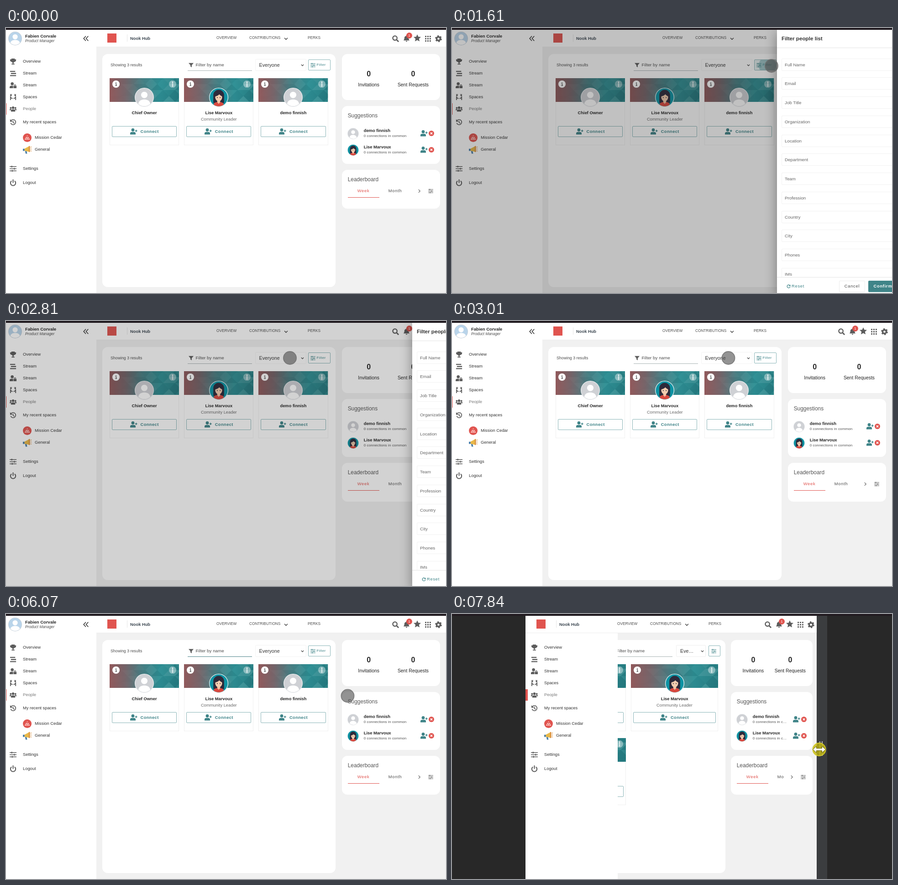
An HTML page for the animation above (8 s loop, 964x581 px).

```html
<!DOCTYPE html>
<html lang="en">
<head>
<meta charset="utf-8">
<title>People directory</title>
<style>
html, body { margin: 0; width: 100%; height: 100%; overflow: hidden; background: #282828; }
#stage { position: relative; width: 964px; height: 581px; overflow: hidden; background: #282828;
  font: 9.33px/20px "Liberation Sans", Arial, sans-serif; color: #4d4d4d; }
#stage div, .i { position: absolute; box-sizing: border-box; }
.t { white-space: nowrap; }
.b { font-weight: bold; color: #262626; }
.cut { overflow: hidden; text-overflow: ellipsis; }
#strip { left: 0; top: 0; width: 964px; height: 4px; background: #211b20; }
#app { top: 0; bottom: 0; overflow: hidden; background: #f1f1f1; }
.body { left: 202px; right: 0; top: 0; bottom: 0; }
.narrow .body { left: 0; }
.menu { left: 0; top: 0; width: 202px; bottom: 0; background: #fff; }
.narrow .menu { clip-path: inset(42px 0 0 0); }
.narrow .user, .narrow .word { display: none; }
.head { left: 0; right: 0; top: 0; height: 42px; background: #fff; border-bottom: 1px solid #ececec; }
.nav { left: calc(50% - 120px); top: 0; width: 228px; height: 42px; font-size: 8.25px; }
.panel { background: #fff; border-radius: 12px; overflow: hidden; }
.main { left: 13px; top: 57px; bottom: 13px; width: calc((100% - 26px) * .69); }
.side { right: 13px; top: 0; bottom: 0; width: calc((100% - 26px) * .291); }
.side .panel { left: 0; right: 0; }
.name { right: 183px; top: 11px; width: 141px; height: 26px; border-bottom: 1px solid #a9b3b5; font-size: 9.8px; }
.name.on { border-bottom: 1.5px solid #4b8288; }
.narrow .name { right: 116px; }
.pick { right: 64px; top: 11px; width: 112px; height: 26px; border: 1px solid #f3f3f3; border-radius: 2px; }
.pick .t { left: 8px; right: 24px; top: 2px; font-size: 10.67px; color: #333; }
.pick.on { right: 65px; width: 110px; background: #a9def1; border: 2px solid #6fa9ba; }
.pick.on .t { left: 6px; top: 1px; color: #51798a; }
.narrow .pick { right: 43px; width: 65px; border-color: #eee; }
.filter { right: 11px; top: 12px; width: 49px; height: 24px; border: 1px solid #8bb5b8; border-radius: 2px; color: #3f8488; overflow: hidden; }
.filter.on { background: radial-gradient(circle at 28px 12px, #9dc3c6 18px, #e3eeee 20px); }
.narrow .filter { width: 26px; }
.cards { left: 16px; right: 16px; top: 53px; display: grid; grid-template-columns: repeat(3, 1fr); gap: 15px 11px; }
.narrow .cards { grid-template-columns: repeat(2, 1fr); }
#stage .card { position: relative; height: 147px; border: 1px solid #f0f0f0; }
.card .mid { left: 0; right: 0; text-align: center; }
.banner { position: absolute; left: -1px; top: -1px; width: calc(100% + 2px); height: 52px; }
.connect { left: 4px; right: 4px; top: 104px; height: 24px; border: 1px solid #8bb5b8; border-radius: 2px;
  display: flex; align-items: center; justify-content: center; gap: 7px; color: #3f8488; font-weight: bold; letter-spacing: .4px; }
.connect .i { position: static; }
#dim { left: 0; top: 4px; width: 964px; bottom: 0; background: #212121; }
#drawer { left: 690px; top: 4px; width: 274px; bottom: 0; background: #fff; box-shadow: 0 8px 24px 2px #0005; overflow: hidden; }
.field { left: 10px; width: 259px; height: 27px; border: 1px solid #f2f2f2; border-radius: 2px; font-size: 9.8px; line-height: 25px; padding-left: 6px; color: #666; }
.btn { top: 550px; height: 25px; line-height: 25px; text-align: center; border-radius: 2px; letter-spacing: .75px; }
#popup { left: 546px; top: 94px; width: 221px; height: 85px; border: 2px solid #989898; border-radius: 8px; font-size: 10.67px;
  box-shadow: 0 12px 40px #0003, 0 2px 12px #0004; }
.open { background: #fff; }
.half { background: #fffb; }
.ghost .t { display: none; }
#handle { top: 4px; bottom: 0; width: 23px; background: #3b3d3f; }
#handle div { top: 275px; width: 2px; height: 32px; background: #b5b5b5; }
#cursor { width: 30px; height: 30px; border-radius: 50%; background: #4b4b4b99; border: 2px solid #73737399; }
#cursor.hit { background: #bdb40fd0; border-color: #d6cd2ce0; }
#cursor svg { display: none; left: -2px; top: -2px; }
#cursor.drag svg { display: block; }
</style>
</head>
<body>
<svg width="0" height="0" style="position:absolute"><defs>
  <linearGradient id="dusk">
    <stop offset="0" stop-color="#91595b"/><stop offset=".22" stop-color="#766469"/>
    <stop offset=".45" stop-color="#4a7d82"/><stop offset=".72" stop-color="#2e8f94"/><stop offset="1" stop-color="#277f84"/>
  </linearGradient>
</defs></svg>
<div id="stage"></div>
<script>
const TEAL = '#3f8488', RED = '#e0544f', GREY = '#5c5c5c';
const line = (d, w = 2) => `<path d="${d}" fill="none" stroke="currentColor" stroke-width="${w}"/>`;
const fill = d => `<path d="${d}"/>`;
const dot = (x, y, r, c = 'currentColor') => `<circle cx="${x}" cy="${y}" r="${r}" fill="${c}"/>`;

// All icons live in a 16 x 16 box.
const icons = {
  trophy: fill('M4 1h8v2h3v2c0 2-2 3.500-4 3.800-.5 1.200-1.500 1.700-2 2V13h2.500v2h-7v-2H7v-2.200c-.5-.3-1.500-.8-2-2C3 8.500 1 7 1 5V3h3z'),
  stream: fill('M1 2h12v2.500H1zM3 7h12v2.500H3zM1 12h14v2.500H1z'),
  lock: dot(6, 4.5, 3.5) + fill('M0 15v-2.500C0 10 2 9 4 9h4v6zM9 9.500h1V8.500a2.500 2.500 0 0 1 5 0v1h1V15H9zm2.500 0h2v-1a1 1 0 0 0-2 0z'),
  spaces: dot(3, 4, 2) + dot(13, 4, 2) + line('M2 15V8l3 3h2M14 15V8l-3 3H9', 2) + line('M5.500 1.500H1M10.500 1.500H15', 1),
  people: dot(8, 5, 3) + dot(2.5, 5.5, 2) + dot(13.5, 5.5, 2) + fill('M3 14v-2c0-2 1.500-3 3-3h4c1.500 0 3 1 3 3v2zM0 11V9.500C0 8.500 1 8 2 8h2.500L2.500 11zM16 11V9.500c0-1-1-1.500-2-1.500h-2.500l2 3z'),
  history: line('M3.500 4A6 6 0 1 1 2.500 10M8 4.500V8.500l3 2', 1.8) + fill('M1 1v6h6z'),
  sliders: line('M0 3h16M0 8h16M0 13h16', 1.6) + line('M5 1v4M11 6v4M6 11v4', 2),
  power: line('M4.500 3.500a6 6 0 1 0 7 0M8 0v8', 2.2),
  search: `<circle cx="6.500" cy="6.500" r="5" fill="none" stroke="currentColor" stroke-width="2.500"/>` + line('M10 10l5 5', 3),
  bell: fill('M7 0h2v1.500c3 .5 4 2.500 4 5 0 3 1 4 2 5.500H1c1-1.500 2-2.500 2-5.500 0-2.500 1-4.500 4-5zM6 13h4a2 2 0 0 1-4 0z'),
  star: fill('M8 0l2.400 5.200 5.600.6-4.200 3.800 1.200 5.700L8 12.400l-5 2.900 1.200-5.700L0 5.800l5.600-.6z'),
  grid: [2, 8, 14].map(y => [2, 8, 14].map(x => fill(`M${x - 1.8} ${y - 1.8}h3.600v3.600h-3.600z`)).join('')).join(''),
  gear: `<g fill="none" stroke="currentColor"><circle cx="8" cy="8" r="4.300" stroke-width="3.600"/><circle cx="8" cy="8" r="6.700" stroke-width="2.400" stroke-dasharray="3.500 3.516"/></g>`,
  back: line('M8 2L2.500 8 8 14M14 2L8.500 8 14 14', 2),
  down: line('M2 5l6 6 6-6', 2.8),
  next: line('M5 2l6 6-6 6', 2),
  funnel: fill('M0 1h16L10 8v7l-4-3V8z'),
  add: dot(6, 4.5, 3.4) + fill('M0 14.500V12c0-2 1.500-3 3.500-3h5c2 0 3.500 1 3.500 3v2.500z') + line('M13.200 4v5M10.700 6.500h5', 1.5),
  cross: dot(8, 8, 8, RED) + `<path d="M5 5l6 6M11 5l-6 6" stroke="#fff" stroke-width="2"/>`,
  close: line('M2 2l12 12M14 2L2 14', 1.6),
  reset: line('M13 4.500A6 6 0 1 0 14 9', 2.2) + fill('M15 1v6H9z'),
  info: dot(8, 8, 8, '#fff') + `<path d="M6.700 7.400H8.500v3.800M6.300 11.400h3.600" fill="none" stroke="#555" stroke-width="1.300"/>` + dot(8, 4.9, 1, '#555'),
  more: dot(8, 8, 8, '#ffffff66') + [4, 8, 12].map(y => dot(8, y, 1.4, '#fff')).join(''),
  team: dot(8, 8, 8, RED) + `<path d="M4 11l2.500-4 1.500 3 1.500-3L12 11zM8 3.500v2" fill="none" stroke="#ffd0cc"/>`,
  horn: `<path d="M2 7l9-5v10L2 10z" fill="#e9b949"/><path d="M11 1.500h2v11h-2z" fill="#d98a34"/><path d="M0 6.500h3v4H0z" fill="#4b7fa8"/><path d="M4 10.500l3 .7 1 4.300H5z" fill="#4b7fa8"/><path d="M14 4l2-1M14 7h2M14 10l2 1" stroke="#d98a34"/>`,
  blank: dot(8, 8, 8, '#eceef0') + dot(8, 8, 7.5, '#cfd1d5') + dot(8, 6, 2.7, '#fff') + '<path d="M3 13.400C3.500 10.500 6 9.800 8 9.800s4.500.7 5 3.600A7.400 7.400 0 0 1 3 13.400z" fill="#fff"/>',
  member: dot(8, 8, 8, '#c9ced3') + dot(8, 8, 7.6, '#b9d4ea') + dot(8, 6, 3, '#fff') + '<path d="M2.500 13C3 10.500 5.500 9.700 8 9.700s5 .8 5.500 3.300A7.500 7.500 0 0 1 2.500 13z" fill="#fff"/>',
  girl: dot(8, 8, 8, '#e6f1f2') + dot(8, 8, 7.5, '#0d93a3') + '<path d="M3.500 12.800V6.200a4.500 4.500 0 0 1 9 0v6.600z" fill="#2d2a3b"/><path d="M3.700 14.100c.4-1.800 2.300-2.300 4.300-2.300s3.900.5 4.300 2.300a7.400 7.400 0 0 1-8.600 0z" fill="#d9483f"/><path d="M6.800 10h2.400v2.200L8 13.400l-1.200-1.200z" fill="#eec3a4"/>' +
    '<ellipse cx="8" cy="7.900" rx="2.900" ry="3.400" fill="#f4cdb0"/><path d="M4.900 7.200C4.900 4.600 6.300 3.800 8 3.800s3.100.8 3.100 3.400C9.700 6.800 9 6 8.500 5.400 8 6.200 6.500 7 4.900 7.200z" fill="#2d2a3b"/>' + dot(6.8, 8.2, .4, '#2d2a3b') + dot(9.2, 8.2, .4, '#2d2a3b')
};

// A negative x is measured from the right edge.
const at = (x, half = 0) => x < 0 ? `right:${-x - half}px` : `left:${x - half}px`;
const svg = (id, s, css = '') => `<svg class="i" viewBox="0 0 16 16" width="${s}" height="${s}" fill="currentColor" style="${css}">${icons[id]}</svg>`;
const icon = (id, x, y, s, color = GREY) => svg(id, s, `${at(x, s / 2)};top:${y - s / 2}px;color:${color}`);
const text = (x, y, str, css = '', cls = '') => `<div class="t ${cls}" style="${at(x)};top:${y - 10}px;${css}">${str}</div>`;
const box = (cls, html, css = '') => `<div class="${cls}" style="${css}">${html}</div>`;

let seed = 11;
const rand = () => (seed = seed * 16807 % 2147483647) / 2147483647;
let facets = '';
for (let r = 0; r < 4; r++) for (let c = 0; c < 13; c++) {
  const x = c * 13 - 13, y = r * 13, h = (r + c) % 2 ? 13 : 0;
  const a = rand() * .12 * c / 13;
  facets += `<path d="M${x} ${y + h}h26l-13 ${h ? -13 : 13}z" fill="${rand() > .5 ? '#fff' : '#002a30'}" opacity="${a.toFixed(3)}"/>`;
}
const banner = `<svg class="banner" viewBox="0 0 152 52" preserveAspectRatio="xMidYMid slice"><rect width="152" height="52" fill="url(#dusk)"/>${facets}</svg>`;

const card = (who, face, role = '') => box('card', banner + icon('info', 13, 11.5, 16) + icon('more', -13, 11.5, 16) +
  svg(face, 42, 'left:calc(50% - 21px);top:20px') +
  box('t mid b', who, 'top:65px') + box('t mid', role, 'top:79px;color:#6b6b6b') +
  box('connect', svg('add', 16) + 'Connect'));

const links = [['trophy', 'Overview', 73], ['stream', 'Stream', 99], ['lock', 'Stream', 125], ['spaces', 'Spaces', 151],
  ['people', 'People', 177], ['history', 'My recent spaces', 206], ['sliders', 'Settings', 308], ['power', 'Logout', 339]];
const menu = box('menu',
  box('user', icon('member', 24, 23, 30) + text(46, 18, 'Fabien Corvale', 'font-size:9.5px', 'b') +
    text(46, 28, 'Product Manager', 'font-size:8.4px;font-style:italic') + icon('back', 179, 23, 14, '#444')) +
  links.map(([id, label, y]) => icon(id, 19, y, 15) + text(41, y, label, label === 'People' ? 'color:#7c7c7c' : 'color:#333')).join('') +
  box('', '', `left:0;top:165px;width:5px;height:25px;background:${RED}`) +
  icon('team', 50, 240, 19) + text(67, 240, 'Mission Cedar', 'color:#333') +
  icon('horn', 50, 266, 19) + text(67, 266, 'General', 'color:#333'));

const head = box('head',
  box('', '', `left:24px;top:12px;width:20px;height:20px;background:${RED}`) +
  box('', '', 'left:67px;top:14px;width:1px;height:16px;background:#e6e6e6') +
  text(74, 23, 'Nook Hub', 'color:#3b4650', 'b') +
  box('nav', text(0, 22, 'OVERVIEW') + text(72, 22, 'CONTRIBUTIONS') + icon('down', 152, 23, 9, '#444') + text(200, 22, 'PERKS')) +
  icon('search', -111, 23, 15) + icon('bell', -87, 23, 15) + icon('star', -63, 22, 16) + icon('grid', -40, 23, 13) + icon('gear', -17, 23, 15) +
  box('', '1', `right:74px;top:10px;width:13px;height:13px;border-radius:50%;background:${RED};color:#fff;font-size:8px;line-height:13px;text-align:center`));

const main = box('panel main',
  text(18, 24, 'Showing 3 results', 'font-size:8.8px') +
  box('name', icon('funnel', 8, 13, 11) + text(18, 13, 'Filter by name')) +
  box('pick', box('t cut', 'Everyone') + icon('down', -7, 12, 7, '#333')) +
  box('filter', icon('sliders', 10, 11, 11, TEAL) + text(18, 11, 'Filter', 'font-size:8px;letter-spacing:.35px', 'word')) +
  box('cards', card('Chief Owner', 'blank') + card('Lise Marvoux', 'girl', 'Community Leader') + card('demo finnish', 'blank')));

const count = (x, label) => box('', box('t b', '0', 'left:0;right:0;top:34px;font-size:16px') +
  box('t', label, 'left:0;right:0;top:58px;font-size:10.400px;color:#222'), `left:calc(${x}% - 40px);width:80px;top:0;height:90px;text-align:center`);
const hint = (face, who, y) => icon(face, 25, y, 25) + text(48, y - 6, who, 'font-size:9.4px', 'b') +
  box('t cut', '0 connections in common', `left:48px;right:55px;top:${y - 4}px;font-size:8px;letter-spacing:.13px`) +
  icon('add', -35, y, 16, TEAL) + icon('cross', -19, y, 12);
const title = str => text(13, 21, str, 'font-size:11.900px;color:#555');
const side = box('side',
  box('panel', count(27.4, 'Invitations') + count(72.6, 'Sent Requests'), 'top:57px;height:101px') +
  box('panel', title('Suggestions') + hint('blank', 'demo finnish', 60) + hint('girl', 'Lise Marvoux', 96), 'top:171px;height:127px') +
  box('panel', title('Leaderboard') + text(34, 46, 'Week', `color:${RED};letter-spacing:.8px`) +
    box('', '', `left:13px;top:60px;width:69px;height:1px;background:${RED}`) +
    box('t', 'Month', 'left:102px;right:62px;top:36px;overflow:hidden;letter-spacing:.8px') +
    icon('next', -46, 46, 9) + icon('sliders', -21, 46, 11), 'top:311px;height:85px'));

const fields = ['Full Name', 'Email', 'Job Title', 'Organization', 'Location', 'Department', 'Team', 'Profession', 'Country', 'City', 'Phones', 'IMs'];
const drawer = fields.map((f, i) => box('field', f, `top:${62.7 + i * 41.73}px`)).join('') +
  box('', '', 'left:0;top:0;width:274px;height:40px;background:#fff;border-bottom:1px solid #e4e4e4') +
  text(10, 19, 'Filter people list', 'font-size:11.700px;color:#333', 'b') + icon('close', 262, 19, 10) +
  box('', '', 'left:0;top:542px;width:274px;height:35px;background:#fff;border-top:1px solid #e4e4e4') +
  icon('reset', 25, 562, 9, TEAL) + text(32, 562, 'Reset', `color:${TEAL};letter-spacing:.75px`) +
  box('btn', 'Cancel', 'left:136px;width:57px;border:1px solid #ececec;line-height:23px') +
  box('btn', 'Confirm', `left:200px;width:64px;background:${TEAL};color:#fff;font-weight:bold`) +
  box('', '', 'left:270px;top:42px;width:2px;height:443px;background:#909090');

document.getElementById('stage').innerHTML =
  `<div id="app">${box('body', head + main + side)}${menu}</div>
  <div id="handle"><div style="left:6px"></div><div style="left:11px"></div></div>
  <div id="dim"></div><div id="drawer">${drawer}</div>
  <div id="popup">${text(9, 21, 'Everyone', 'color:#333') + text(9, 60, 'My connections', 'color:#333')}</div>
  <div id="strip"></div>
  <div id="cursor"><svg class="i" width="30" height="30"><path d="M1 15l8-7v4.500h12V8l8 7-8 7v-4.500H9V22z" fill="#fff" stroke="#6f6a10"/></svg></div>`;

// Each step lists only what changes; x is the left edge of the viewport.
const steps = [
  [0, { x: -4, cur: '', at: [0, 0], dim: 0, slide: 330, popup: '', fade: 1, hot: '' }],
  [200, { cur: 'rest', at: [938, 378] }],
  [400, { at: [902, 332] }],
  [600, { at: [832, 243] }],
  [800, { at: [756, 148] }],
  [1000, { at: [713, 96] }],
  [1190, { at: [700, 83] }],
  [1390, { cur: 'hit', hot: 'filter' }],
  [1610, { cur: 'rest', dim: .28, slide: 22 }],
  [1810, { dim: .45, slide: 1, hot: '' }],
  [2010, { dim: .46, slide: 0 }],
  [2410, { at: [672, 83] }],
  [2610, { at: [652.5, 82], cur: 'hit' }],
  [2810, { at: [622, 81], cur: 'rest', dim: .2, slide: 200 }],
  [3010, { at: [605.5, 81], dim: 0, slide: 330 }],
  [3430, { cur: 'hit', popup: 'half' }],
  [3630, { cur: 'rest', popup: 'open' }],
  [4230, { popup: 'ghost', hot: 'pick' }],
  [4430, { fade: .4 }],
  [4630, { popup: '', fade: 1, hot: '' }],
  [5250, { at: [575, 83] }],
  [5450, { at: [532, 86], hot: 'name' }],
  [5650, { at: [560, 96] }],
  [5870, { at: [652, 127] }],
  [6070, { at: [748.5, 179.5] }],
  [6250, { at: [835, 308], hot: '' }],
  [6450, { at: [908, 303] }],
  [6650, { at: [953, 298] }],
  [6850, { at: [965, 297], cur: 'hit drag' }],
  [7050, { x: 6 }],
  [7250, { x: 36 }],
  [7440, { x: 72 }],
  [7640, { x: 118 }],
  [7840, { x: 161 }]
];

const el = id => document.getElementById(id);
function show(n) {
  const s = Object.assign({}, ...steps.slice(0, n + 1).map(r => r[1]));
  const right = Math.min(964, 964 - s.x), narrow = s.x > 0;
  const [cx, cy] = narrow ? [right + 1.5, 297] : s.at;
  el('app').style.left = s.x + 'px';
  el('app').style.width = right - s.x + 'px';
  el('app').className = narrow ? 'narrow' : '';
  el('handle').style.display = narrow ? '' : 'none';
  el('handle').style.left = right - 4 + 'px';
  el('dim').style.opacity = s.dim;
  el('drawer').style.transform = `translateX(${s.slide}px)`;
  el('popup').className = s.popup;
  el('popup').style.display = s.popup ? '' : 'none';
  el('popup').style.opacity = s.fade;
  el('cursor').className = s.cur;
  el('cursor').style.display = s.cur ? '' : 'none';
  el('cursor').style.transform = `translate(${cx - 15}px, ${cy - 15}px)`;
  for (const k of ['name', 'pick', 'filter']) document.querySelector('.' + k).classList.toggle('on', s.hot === k);
}

let last = -1;
function tick() {
  const t = performance.now() % 8000;
  const n = steps.filter(r => r[0] <= t).length - 1;
  if (n !== last) show(last = n);
  requestAnimationFrame(tick);
}
tick();
</script>
</body>
</html>
```
